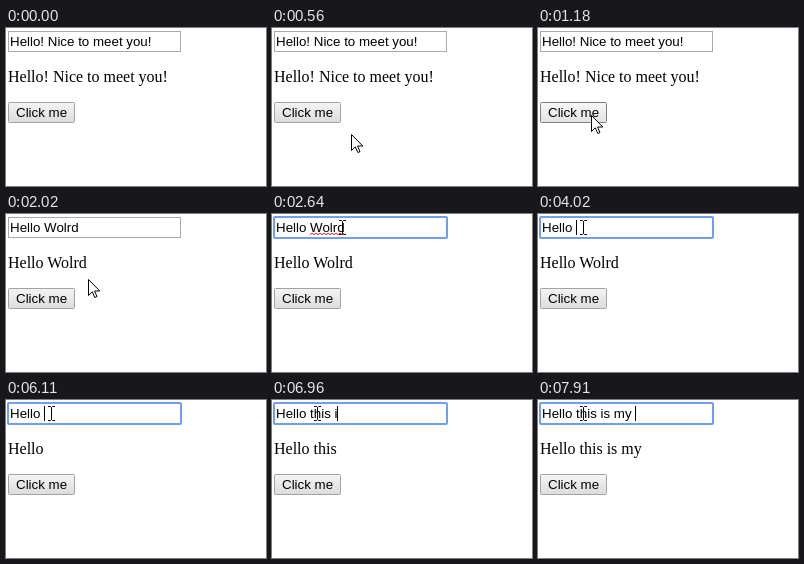
These frames come from a looping animation (260x158 px, 8000 ms). An HTML page:

```html
<!DOCTYPE html>
<html lang="en">
<head>
<meta charset="utf-8">
<title>Text binding demo</title>
<style>
  html, body { margin: 0; width: 100%; height: 100%; overflow: hidden; background: #fff; }
  svg { display: block; position: absolute; left: 0; top: 0; }
  text { white-space: pre; fill: #000; }
  .ui { font: 13.333px "Liberation Sans", Arial, sans-serif; }
  .body { font: 16px "Liberation Serif", "Times New Roman", serif; }
  tspan { fill: #fff; }
</style>
</head>
<body>
<svg width="260" height="158" viewBox="0 0 260 158">
  <defs>
    <linearGradient id="up" x2="0" y2="1">
      <stop stop-color="#f4f4f4"/><stop offset="1" stop-color="#dcdcdc"/>
    </linearGradient>
    <linearGradient id="over" x2="0" y2="1">
      <stop stop-color="#f8f8f8"/><stop offset="1" stop-color="#e2e2e2"/>
    </linearGradient>
    <linearGradient id="down" x2="0" y2="1">
      <stop stop-color="#d6d6d6"/><stop offset="1" stop-color="#ebebeb"/>
    </linearGradient>
  </defs>

  <rect x="2.5" y="3.5" width="172" height="20" fill="#fff" stroke="#a9a9a9"/>
  <rect id="ring" x="2" y="3" width="173" height="21" rx="1" fill="none" stroke="#6f9ef2" stroke-width="2"/>
  <rect id="mark" y="6" height="15" fill="#3390ff"/>
  <text class="ui" x="4" y="18" id="field"></text>
  <path id="wave" fill="none" stroke="#f22"/>
  <rect id="caret" y="6" width="1" height="15"/>

  <text class="body" x="2" y="54" id="label"></text>

  <rect id="button" x="2.5" y="74.5" width="66" height="20" rx="1"/>
  <text class="ui" x="10" y="89">Click me</text>

  <path id="arrow" d="M.5.5V16.5L4.3 12.8 6.8 18.5 9 17.6 6.6 12H11.8Z" fill="#fff" stroke="#000"/>
  <path id="beam" d="M-3 .5H-.5L.5 1.5 1.5.5H4M.5 1.5V13.5M-3 14.5H-.5L.5 13.5 1.5 14.5H4" fill="none" stroke="#000"/>
</svg>
<script>
const LOOP = 8000, STEP = 77.3, LAG = 75;
const PRESS = 1330, CLICK = 1490, FOCUS = 2490, DRAG = 2635, CUT = 4020;
const GREETING = 'Hello! Nice to meet you!', TYPO = 'Hello Wolrd', STEM = 'Hello ';

// Pointer waypoints: time, x, y
const PATH = [
  [175, 110, 127], [420, 84, 110], [700, 61, 94], [948, 52, 89], [1105, 52, 89],
  [1179, 53, 87], [1790, 53, 87], [1862, 60, 82], [2016, 82, 65], [2171, 88, 41],
  [2326, 79, 17], [2480, 74, 14], [2558, 73, 14], [2635, 70, 14], [2870, 60, 14], [3170, 45, 14]
];

// Typed keys with their times
const KEYS = [
  ['t', 6340], ['h', 6420], ['i', 6570], ['s', 6650], [' ', 6720],
  ['i', 6890], ['s', 7040], [' ', 7120], ['m', 7350], ['y', 7670], [' ', 7910]
];

const $ = id => document.getElementById(id);
const el = {};
for (const id of ['ring', 'mark', 'field', 'wave', 'caret', 'label', 'button', 'arrow', 'beam']) el[id] = $(id);

const pen = document.createElement('canvas').getContext('2d');
pen.font = '13.333px "Liberation Sans", Arial, sans-serif';
const edge = text => 4 + pen.measureText(text).width;

const set = (node, attrs) => { for (const k in attrs) node.setAttribute(k, attrs[k]); };
const show = (node, on) => set(node, { visibility: on ? 'visible' : 'hidden' });

set(el.wave, { d: 'M38 20.8' + 'l2 -1.8l2 1.8'.repeat(8) + 'l2 -1.8' });

function textAt(t) {
  if (t < CLICK) return GREETING;
  if (t < CUT) return TYPO;
  return STEM + KEYS.filter(k => t >= k[1]).map(k => k[0]).join('');
}

function pointerAt(t) {
  const base = t < 1862 ? 175 : 1862;
  const q = base + Math.floor((t - base) / STEP) * STEP;
  const i = PATH.findIndex(p => p[0] > q);
  if (i < 0) return PATH[PATH.length - 1].slice(1);
  if (i === 0) return PATH[0].slice(1);
  const a = PATH[i - 1], b = PATH[i], f = (q - a[0]) / (b[0] - a[0]);
  return [1, 2].map(n => Math.round(a[n] + (b[n] - a[n]) * f));
}

// First selected character for a drag that has reached x
function selectFrom(x) {
  let i = STEM.length;
  while (i < TYPO.length && (edge(TYPO.slice(0, i)) + edge(TYPO.slice(0, i + 1))) / 2 < x - 1) i++;
  return i;
}

function caretOn(t) {
  if (t < FOCUS || (t >= DRAG && t < CUT)) return false;
  return !(t >= 4560 && t < 5110) && !(t >= 5570 && t < 6110);
}

function draw(t) {
  const [x, y] = pointerAt(t);
  const text = textAt(t);
  const focused = t >= FOCUS;
  const inField = y < 24;

  const dragging = t >= DRAG && t < CUT;
  const from = dragging ? selectFrom(x) : text.length;
  el.field.textContent = text.slice(0, from);
  if (dragging) {
    const part = document.createElementNS('http://www.w3.org/2000/svg', 'tspan');
    part.textContent = text.slice(from);
    el.field.append(part);
    const left = edge(text.slice(0, from));
    set(el.mark, { x: Math.round(left), width: Math.round(edge(text)) - Math.round(left) });
  }
  show(el.mark, dragging);
  show(el.ring, focused);
  show(el.wave, focused && text === TYPO);
  set(el.caret, { x: Math.round(edge(text)) });
  show(el.caret, caretOn(t));

  el.label.textContent = textAt(t < FOCUS ? t : t - LAG);

  const over = t >= 180 && x < 69 && y >= 74 && y < 95;
  const down = t >= PRESS && t < CLICK;
  set(el.button, {
    fill: `url(#${down ? 'down' : over ? 'over' : 'up'})`,
    stroke: over ? '#808080' : '#a3a3a3'
  });

  show(el.arrow, t >= 180 && !inField);
  show(el.beam, inField);
  set(el.arrow, { transform: `translate(${x} ${y})` });
  set(el.beam, { transform: `translate(${x} ${y - 8})` });
}

const start = performance.now();
function tick() {
  draw((performance.now() - start) % LOOP);
  requestAnimationFrame(tick);
}
tick();
</script>
</body>
</html>
```
